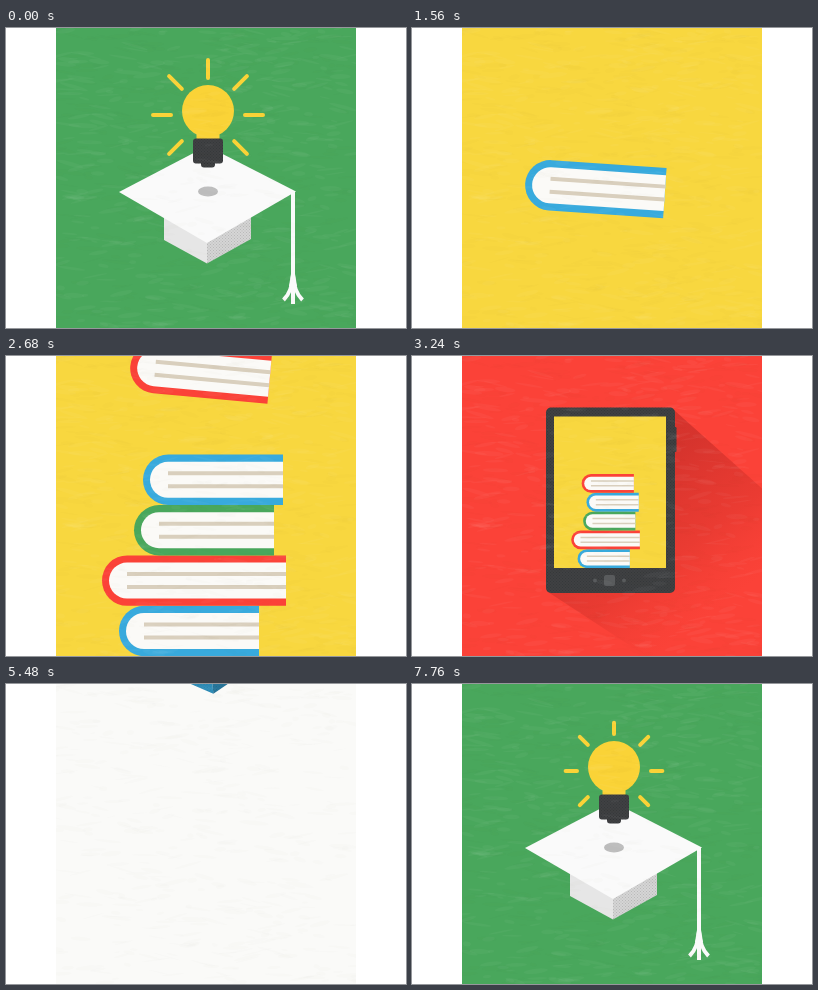
Write an HTML page with a canvas that moves like this. It is 400 px wide and 300 px high and loops after 7.8 s.

```html
<!DOCTYPE html>
<html lang="en">
<head>
<meta charset="utf-8">
<title>Learning loop</title>
<style>
html, body { margin: 0; width: 100%; height: 100%; overflow: hidden; background: #fff; }
canvas { display: block; width: 400px; height: 300px; }
</style>
</head>
<body>
<canvas id="stage"></canvas>
<script>
const LOOP = 7800, STEP = 40;
const C = {
  green: '#49a75c', yellow: '#f8d73f', red: '#fb4238', blue: '#38aadd',
  paper: '#fafaf8', dark: '#3f4143', line: '#d9cfbd', bulb: '#fad337'
};
const canvas = document.getElementById('stage');
const ratio = Math.max(1, window.devicePixelRatio || 1);
canvas.width = 400 * ratio;
canvas.height = 300 * ratio;
const g = canvas.getContext('2d');

// Easing
const clamp = v => Math.max(0, Math.min(1, v));
const span = (t, a, b) => clamp((t - a) / (b - a));
const mix = (a, b, p) => a + (b - a) * p;
const easeIn = p => p * p * p;
const easeOut = p => 1 - (1 - p) ** 3;
const easeBoth = p => p < .5 ? 4 * p ** 3 : 1 - (2 - 2 * p) ** 3 / 2;
const backOut = p => 1 + 2.4 * (p - 1) ** 3 + 1.4 * (p - 1) ** 2;
function bounce(p) {
  if (p < .6) return (p / .6) ** 2;
  const q = (p - .8) / .2;
  return 1 - .07 * (1 - q * q);
}

// Drawing helpers
function rect(x, y, w, h, color, r = 0) {
  g.fillStyle = color;
  g.beginPath();
  g.roundRect(x, y, w, h, r);
  g.fill();
}
function disc(x, y, rx, color, ry = rx) {
  g.fillStyle = color;
  g.beginPath();
  g.ellipse(x, y, rx, ry, 0, 0, 7);
  g.fill();
}
function poly(points, color) {
  g.fillStyle = color;
  g.beginPath();
  points.forEach(([x, y]) => g.lineTo(x, y));
  g.closePath();
  g.fill();
}
function group(draw) {
  g.save();
  draw();
  g.restore();
}
function scaleAt(x, y, s) {
  g.translate(x, y);
  g.scale(s, s);
  g.translate(-x, -y);
}
const ground = color => rect(50, 0, 300, 300, color);

function makeTile(w, h, paint) {
  const c = document.createElement('canvas');
  c.width = w;
  c.height = h;
  paint(c.getContext('2d'));
  return c;
}
const dots = g.createPattern(makeTile(3, 3, k => {
  k.fillStyle = 'rgba(0,0,0,.13)';
  k.fillRect(0, 0, 1, 1);
  k.fillRect(1.5, 1.5, 1, 1);
}), 'repeat');

// Soft paper smudges
const paper = makeTile(300, 300, k => {
  let seed = 11;
  const rnd = () => (seed = seed * 16807 % 2147483647) / 2147483647;
  for (let i = 0; i < 900; i++) {
    k.fillStyle = i % 2 ? 'rgba(255,255,255,.035)' : 'rgba(90,70,40,.012)';
    k.beginPath();
    k.ellipse(rnd() * 300, rnd() * 300, 3 + rnd() * 12, .6 + rnd() * 2, rnd() * .6 - .3, 0, 7);
    k.fill();
  }
});

// Graduation cap
const WHITE_CAP = { top: '#fafafa', left: '#e6e6e6', right: '#d5d5d5', hole: '#bcbcbc', rx: 10, ry: 5 };
const BLUE_CAP = { top: C.blue, left: '#2f8fbb', right: '#28779c', hole: C.paper, rx: 12, ry: 6 };

function cap(look, drop) {
  const left = [[158, 180], [201, 204], [201, 235.5], [158, 212]];
  const right = [[201, 204], [245, 180], [245, 211], [201, 235.5]];
  poly(left, look.left);
  poly(right, look.right);
  poly(right, dots);
  if (look === BLUE_CAP) poly(left, dots);
  poly([[113, 164], [201, 118], [290, 163.5], [201, 215]], look.top);
  disc(202, 163.5, look.rx, look.hole, look.ry);

  const knot = 206 + drop;
  g.strokeStyle = look.top;
  g.lineWidth = 4;
  g.beginPath();
  g.moveTo(287, 163);
  g.lineTo(287, knot + 27);
  for (const side of [-1, 1]) {
    g.moveTo(287, knot - 2);
    g.quadraticCurveTo(287 + side * 1, knot + 15, 287 + side * 9.5, knot + 23);
  }
  g.stroke();
  poly([[285, knot - 3], [289, knot - 3], [291, knot + 9], [283, knot + 9]], look.top);
}

// Light bulb
function bulb() {
  disc(202, 83, 26, C.bulb);
  poly([[182, 99], [222, 99], [213.5, 106], [213.5, 113], [190.5, 113], [190.5, 106]], C.bulb);
  for (const fill of [C.dark, dots]) {
    rect(195, 131, 14, 8.5, fill, 3);
    rect(187, 110.5, 30, 25, fill, 3);
  }
}
function rays(from, to) {
  if (to - from < .5) return;
  g.strokeStyle = C.bulb;
  g.lineWidth = 4;
  g.lineCap = 'round';
  g.beginPath();
  for (let i = -5; i <= 1; i++) {
    const a = i * Math.PI / 4, x = Math.cos(a), y = Math.sin(a);
    g.moveTo(202 + x * from, 87 + y * from);
    g.lineTo(202 + x * to, 87 + y * to);
  }
  g.stroke();
}

// Books: left edge, width, colour, tilt while falling
const books = [
  [113, 140, C.blue, 3.9],
  [96, 184, C.red, -4],
  [128, 140, C.green, 4.5],
  [137, 140, C.blue, -4],
  [124, 140, C.red, 5.3]
];
function book(w, color) {
  rect(-w / 2, -25.2, w, 50.4, color, [25.2, 0, 0, 25.2]);
  rect(-w / 2 + 7, -18, w - 7, 36, '#fbfaf7', [18, 0, 0, 18]);
  for (const y of [-8.5, 4.5]) rect(-w / 2 + 25, y, w - 25, 4, C.line);
}
function stack(t) {
  const gravity = 305 / 400 ** 2;
  books.forEach(([x, w, color, tilt], i) => {
    const end = 275 - i * 50.4, start = i < 4 ? -30 : -40;
    const land = 1644 + i * 277;
    const fallTime = Math.sqrt((end - start) / gravity);
    const age = t - land + fallTime;
    if (age < 0) return;
    const y = Math.min(end, start + gravity * age * age);
    group(() => {
      g.translate(x + w / 2, y);
      g.rotate(tilt * clamp((land - t) / 73) * Math.PI / 180);
      book(w, color);
    });
  });
}

// Tablet
function tabletShadow(alpha) {
  if (alpha <= 0) return;
  const fade = g.createLinearGradient(200, 145, 290, 265);
  fade.addColorStop(0, 'rgba(190,42,38,.6)');
  fade.addColorStop(.55, 'rgba(200,45,38,.32)');
  fade.addColorStop(1, 'rgba(230,55,45,0)');
  group(() => {
    g.globalAlpha = alpha;
    poly([[262, 54], [372, 152], [372, 330], [280, 330], [136, 236]], fade);
  });
}
function tablet() {
  for (const fill of [C.dark, dots]) {
    rect(262, 71, 2.5, 25, fill, 1);
    rect(134, 51.5, 129, 185.5, fill, 5);
  }
  rect(142, 60.5, 112, 151.5, C.yellow);
  group(() => {
    g.beginPath();
    g.rect(142, 60.5, 112, 151.5);
    g.clip();
    g.translate(198, 212);
    g.scale(112 / 300, 112 / 300);
    g.translate(-200, -300);
    stack(3000);
  });
  rect(192, 219, 11, 11, '#595b5d', 2);
  disc(183, 224.5, 2, '#595b5d');
  disc(212, 224.5, 2, '#595b5d');
}

// Cloud
function cloud(slot) {
  disc(132, 141.7, 46.7, C.paper);
  disc(204, 107, 59.7, C.paper);
  disc(274, 150.7, 38, C.paper);
  rect(132, 130, 142, 58.4, C.paper);
  const w = 136 * slot;
  if (w > 1) rect(199 - w / 2, 165.8, w, 9.6, C.red, 4.8);
}

// Scenes
function ideaScene(t) {
  ground(C.green);
  cap(WHITE_CAP, 43);
  const out = span(t, 520, 760);
  rays(mix(37, 78, easeOut(out)), mix(55, 78, easeOut(span(t, 520, 700))));
  bulb();
  const p = span(t, 780, 1200);
  if (p > 0) disc(202, mix(83, 120, p), 26 + 235 * easeIn(p), C.yellow);
}

function bookScene(t) {
  const p = easeBoth(span(t, 2790, 3200));
  if (p === 0) {
    ground(C.yellow);
    stack(t);
    return;
  }
  ground(C.red);
  group(() => {
    g.translate(mix(200, 198, p), mix(300, 212, p));
    const z = mix(300 / 112, 1, p);
    g.scale(z, z);
    g.translate(-198, -212);
    tabletShadow(p);
    tablet();
  });
}

function uploadScene(t) {
  ground(C.red);
  const grow = easeIn(span(t, 4840, 5240));
  const down = 150 * easeBoth(span(t, 3600, 4000));
  const up = 245 * easeBoth(span(t, 4120, 4600));
  group(() => {
    g.translate(0, -200 * (1 - backOut(span(t, 3640, 4040))));
    scaleAt(200, 135, 1 + grow * 6);
    cloud(1 - span(t, 4800, 4960));
  });
  if (up >= 240) return;
  group(() => {
    if (t >= 4040) {
      g.beginPath();
      g.rect(50, 171, 300, 129);
      g.clip();
    }
    g.translate(0, down - up);
    tabletShadow(1 - span(t, 3480, 3680));
    tablet();
  });
}

function capScene(t) {
  ground(C.paper);
  const fall = span(t, 5360, 5920);
  const drop = 43 * backOut(span(t, 6400, 6760));
  const sink = 1.5 * (1 - span(t, 6400, 6520));
  if (fall > 0) group(() => {
    g.translate(200, 165 + sink - 260 * (1 - bounce(fall)));
    g.rotate(-.14 * (1 - span(t, 5360, 5700)));
    g.translate(-200, -165);
    cap(BLUE_CAP, drop);
  });
  const wipe = easeIn(span(t, 6440, 6880));
  if (wipe > 0) group(() => {
    g.beginPath();
    g.arc(202, 164, 235 * wipe, 0, 7);
    g.clip();
    ground(C.green);
    g.translate(0, sink);
    cap(WHITE_CAP, drop);
  });
  const rise = span(t, 7040, 7440);
  if (rise > 0) group(() => {
    g.translate(0, 24 * (1 - easeOut(rise)));
    scaleAt(202, 139, Math.max(.01, backOut(rise)));
    bulb();
  });
  rays(37, mix(37, 55, span(t, 7640, 7830)));
}

function render(now) {
  const t = Math.floor(now % LOOP / STEP) * STEP;
  g.setTransform(ratio, 0, 0, ratio, 0, 0);
  g.fillStyle = '#fff';
  g.fillRect(0, 0, 400, 300);
  group(() => {
    g.beginPath();
    g.rect(50, 0, 300, 300);
    g.clip();
    if (t < 1200) ideaScene(t);
    else if (t < 3240) bookScene(t);
    else if (t < 5280) uploadScene(t);
    else capScene(t);
    g.drawImage(paper, 50, 0);
  });
}

const begin = performance.now();
function tick() {
  render(performance.now() - begin);
  requestAnimationFrame(tick);
}
tick();
</script>
</body>
</html>
```
